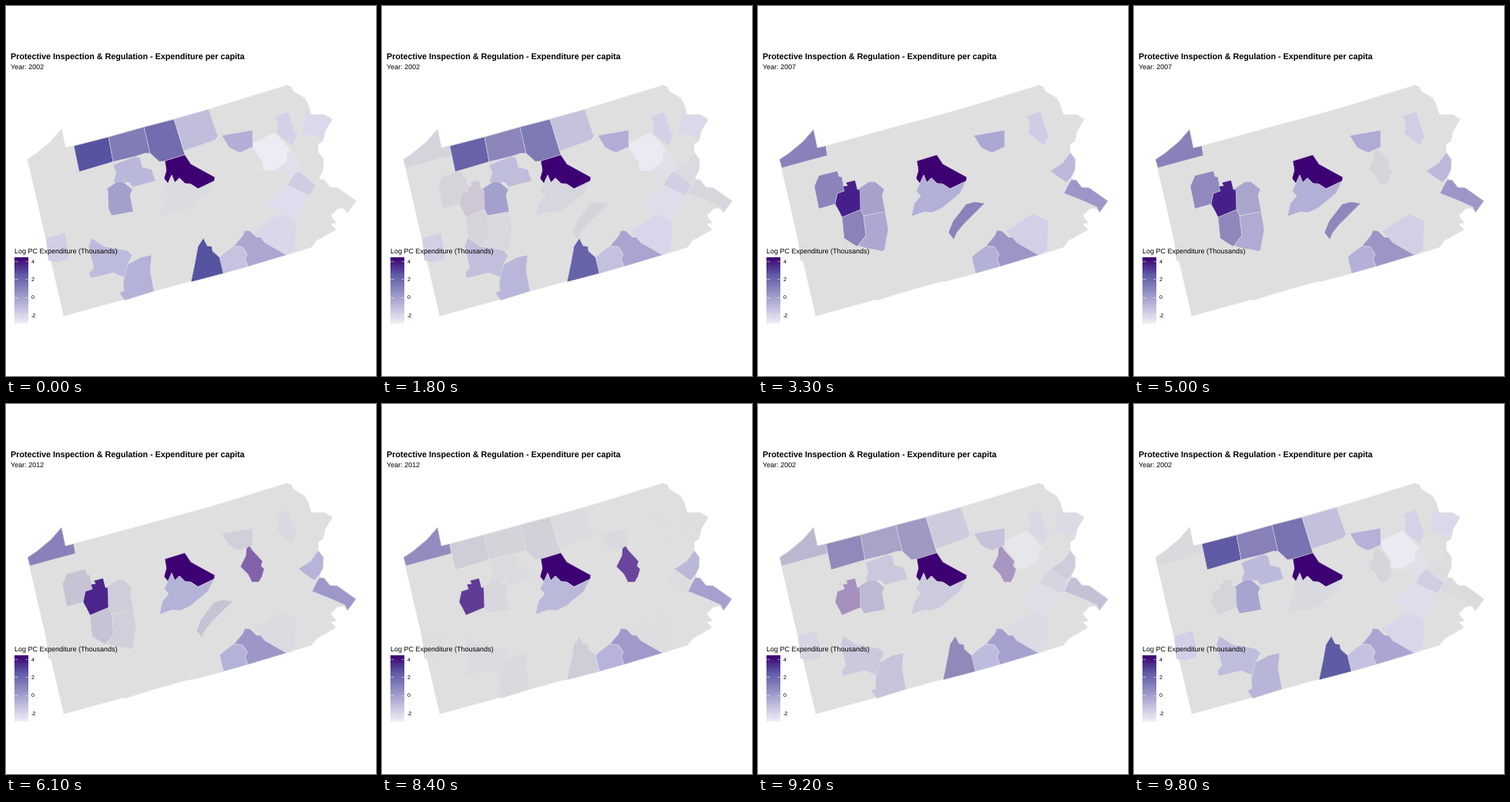
A matplotlib script for the animation above (10000 ms loop, 480 by 480 pixels).

```python
import numpy as np
import matplotlib.pyplot as plt
from matplotlib.animation import FuncAnimation
from matplotlib.colors import LinearSegmentedColormap, to_rgb
from matplotlib.patches import Polygon

plt.rcParams["font.family"] = ["Liberation Sans"]
plt.rcParams["text.hinting"] = "none"

SIZE, DPI, STEP = 480, 100, 100
NA, BORDER = "#DFDFDF", "#E4E4E4"
YEARS = (2002, 2007, 2012)

# Colours blend in CIELAB.
TO_XYZ = np.array([[.4124, .3576, .1805], [.2126, .7152, .0722], [.0193, .1192, .9505]])
WHITE = TO_XYZ.sum(axis=1)
TO_LAB = np.array([[0, 116, 0], [500, -500, 0], [0, 200, -200]])


def rgb_to_lab(color):
    c = np.array(to_rgb(color))
    linear = np.where(c > .04, ((c + .055) / 1.055) ** 2.4, c / 12.92)
    return TO_LAB @ np.cbrt(TO_XYZ @ linear / WHITE)


def lab_to_rgb(lab):
    xyz = np.linalg.solve(TO_LAB, lab) ** 3 * WHITE
    c = np.clip(np.linalg.solve(TO_XYZ, xyz), 0, 1)
    return np.clip(np.where(c > .003, 1.055 * c ** (1 / 2.4) - .055, 12.92 * c), 0, 1)


fig = plt.figure(figsize=(SIZE / DPI, SIZE / DPI), dpi=DPI, facecolor="white")
ax = fig.add_axes([0, 0, 1, 1])


def label(x, y, text, px, **kw):
    return ax.text(x, y, text, fontsize=px * 72 / DPI, color="black",
                   ha="left", va="baseline", zorder=5, **kw)


areas = []


def county(points, first=NA, second=NA, third=NA):
    """Add one area with its colour in each of the three years."""
    patch = ax.add_patch(Polygon(points, ec=BORDER, lw=.35, zorder=2, joinstyle="round"))
    areas.append((patch, [rgb_to_lab(c) for c in (first, second, third)]))


# Borders shared by the state and its counties
lake = [(28, 199), (40, 191), (58, 176), (66, 167), (72, 160), (77, 184), (88, 181.5)]
top_a, top_b, top_c, top_d = (133, 170), (179, 157), (218, 147), (263, 134)
pike = [(388, 134), (396, 141), (413, 141), (423, 147), (414, 162), (411, 175)]
easton = [(405, 190), (412, 199), (411, 213), (407, 221)]
bucks = [(407, 225), (413, 226), (420, 235), (430, 236), (437, 241), (454, 253),
         (443, 268)]
south_west, south_east = (75, 402), (364, 323)

state = ax.add_patch(Polygon(
    lake + [top_d, (364, 103), (370, 105), (373, 111), (387, 119), (392, 128)]
    + pike[1:] + [(405, 179)] + easton + bucks
    + [(438, 262), (430, 263), (421, 272), (428, 281), (421, 283), (428, 290),
       (403, 304), (396, 313), south_east, south_west], fc=NA, ec=NA, lw=.3))

# Faint borders between the areas without data, along the tilt of the map.
along, down = np.array([44, -12]), np.array([10.5, 45])
for row in range(1, 5):
    for col in range(10):
        start = np.array(lake[0]) + col * along + row * down
        bend = start + (.5 + .1 * (-1) ** col) * along
        path = np.array([start - down * (1 - .2 * (col % 2)), start, bend, start + along])
        ax.plot(*path.T, color="#E2E2E2", lw=.4, zorder=1.5, clip_path=state)

# Northern tier
f, g, h = (139, 202), (187, 191), (232, 193)
county(lake + [(90, 194), (60, 202), (31, 210)], NA, "#8A81BA", "#8A81BA")
county([lake[-1], top_a, f, (95, 215)], "#5653A0")
county([top_a, top_b, g, (180, 191), (168, 195), f], "#817BB6")
county([top_b, top_c, h, (206, 201), (199, 202), g], "#716DAE")
county([top_c, top_d, (275, 169), (271, 174), (231, 188)], "#C1BEDC")
county([(280, 168), (320, 161), (320, 183), (304, 190), (298, 188), (289, 183)],
       "#B2AED6", "#ABA8D4")

# North west
p, q, r = (133, 264), (137, 272), (140, 298)
clarion_w = [(112, 240), (103, 243), (100, 257), (105, 266), (109, 274)]
county([(139, 206), (168, 195), (174, 197), (177, 209), (189, 212), (194, 227),
        (164, 235), (160, 229), (139, 229), (143, 217)], "#BAB8DA")
county([(129, 238), (144, 228), (152, 228), (164, 238), (161, 245), (165, 267), q, p],
       "#A3A0CE", "#A6A2CB")
county([(73, 234), (79, 220), (103, 214), (105, 221), (109, 222)] + clarion_w[:3]
       + [(79, 263)], NA, "#8B84BB")
county([clarion_w[-1], p, q, r, (129, 312), (112, 304)], NA, "#8A82B9")
county([q, (165, 267), (169, 290), (164, 317), (156, 319), (130, 311), r],
       NA, "#ACA8D2")
county(clarion_w + [p, (132, 238), (129, 238), (126, 226), (114, 229), (116, 233),
                    (110, 234)], NA, "#46208A", "#4E278D")

# Centre
ridge = [(205, 224), (210, 230), (215, 219), (219, 229), (225, 223), (232, 230),
         (240, 231), (249, 237), (270, 227)]
county(ridge[1:] + [(262, 243), (239, 262), (226, 268), (216, 267), (199, 273),
                    (203, 256), (211, 246), (205, 240)],
       "#DBDBE0", "#B2B0D7", "#B5B4D9")
county(ridge + [(271, 222), (240, 205), h, (206, 201), (208, 213)],
       *["#3D0072"] * 3)
county([(294, 256), (266, 284), (258, 294), (254, 303), (247, 294), (253, 279),
        (270, 257), (281, 254)], NA, "#8A82BA")

# East
s, t, u = (379, 214), (390, 222), (371, 188)
county([(320, 184), (321, 177), (349, 164), u, (365, 190), (365, 201),
        (349, 214), (334, 213), (333, 203)], "#EDEBF4")
county([(316, 184), (320, 190), (333, 204), (331, 210), (335, 214), (332, 224),
        (328, 231), (319, 231), (314, 221), (304, 211), (311, 197), (312, 187)],
       NA, NA, "#573194")
county([(349, 143), (366, 137), (377, 169), (371, 181), (350, 165), (353, 154)],
       "#D3D1E7", "#CFCCE5")
county(pike + [(402, 169), (384, 166)], "#DAD8EA")
county([(365, 190), u, (378, 193), (383, 207), s, (370, 222), (350, 213), (365, 201)],
       "#E1DFEA")
county([(371, 222), s, t, (402, 232), (394, 246), (365, 233)], "#CFCDE3")
county([(335, 257), (365, 232), (392, 246), (375, 279), (356, 270)], "#DFDDED")
county([s, (395, 204)] + easton + [(400, 229), t], NA, "#BBB8DC", "#B5B3D8")
county([(397, 243), (403, 231)] + bucks + [(440, 261), (420, 252)],
       NA, "#9C97C8", "#9D98CB")

# South
york_w = [(296, 311), (307, 313), (313, 322), (310, 328), (314, 338)]
v, w, x = (336, 307), (282, 347), (277, 326)
county([(321, 292), (357, 269), (377, 279), (375, 318), south_east, v],
       "#D9D7EA", "#D2CFE6")
county(york_w + [south_east, v, (330, 300), (325, 300), (317, 292), (310, 291),
                 (307, 298)], "#ABA7D1", "#9C96C6", "#9D98CA")
county(york_w + [w, x, (286, 318)], "#C5C3E0", "#B4B1D8", "#B5B2DA")
county([(256, 301), (261, 311), (267, 312), (268, 318), x, w, (240, 358),
        (245, 334), (249, 312)], "#5654A0")
county([(111, 301), (128, 312), (157, 317), (164, 323), (158, 335), (156, 353),
        (139, 346), (110, 353), (108, 346), (114, 340), (107, 312)], "#BDBBDC")
county([(158, 335), (175, 326), (189, 323), (187, 343), (192, 370), (154, 382),
        (147, 372), (153, 369), (152, 358)], "#B4B2D8")
county([(52, 301), (76, 294), (82, 320), (81, 329), (65, 333), (55, 330)], "#D1CEE6")

# Titles and legend
label(6.5, 69.3, "Protective Inspection & Regulation - Expenditure per capita",
      10.8, weight="bold")
year = label(6.5, 82.2, "", 9)
label(11, 321.2, "Log PC Expenditure (Thousands)", 9)
ramp = LinearSegmentedColormap.from_list(
    "ramp", [(0, "#F0EEF6"), (.4, "#A29ECC"), (.74, "#5F5AA5"), (1, "#3D0072")])
ax.imshow(np.linspace(1, 0, 86)[:, None], cmap=ramp, extent=(11, 28.3, 412, 326),
          aspect="auto", interpolation="bilinear", zorder=4)
for value in (4, 2, 0, -2):
    y = 377.8 - 11.7 * value
    for left in (11, 24.8):
        ax.plot([left, left + 3.5], [y, y], color="white", lw=.4,
                solid_capstyle="butt", zorder=5)
    label(33, y + 2.6, str(value), 7.2)

ax.set(xlim=(0, SIZE), ylim=(SIZE, 0))
ax.axis("off")

# Each transition: time of zero progress, then the times at which it is redrawn.
FADE = 1700
TRANSITIONS = (
    (1600, [*range(1800, 3201, 200), 3300]),
    (4900, [*range(5000, 5801, 200), 5900, 6100, 6400, 6600]),
    (8200, [*range(8400, 9801, 200)]),
)


def state_at(ms):
    """Return the leaving year's index and the progress to the next."""
    index, progress = 0, 0
    for i, (start, ticks) in enumerate(TRANSITIONS):
        done = [tick for tick in ticks if tick <= ms]
        if done:
            index, progress = i, (done[-1] - start) / FADE
    return index, progress


def draw(frame):
    i, done = state_at(frame * STEP)
    j = (i + 1) % 3
    for patch, labs in areas:
        patch.set_facecolor(lab_to_rgb((1 - done) * labs[i] + done * labs[j]))
    year.set_text(f"Year: {YEARS[j if done > .5 else i]}")
    return [year]


anim = FuncAnimation(fig, draw, frames=100, interval=STEP, repeat=True, repeat_delay=0)
plt.show()
```
